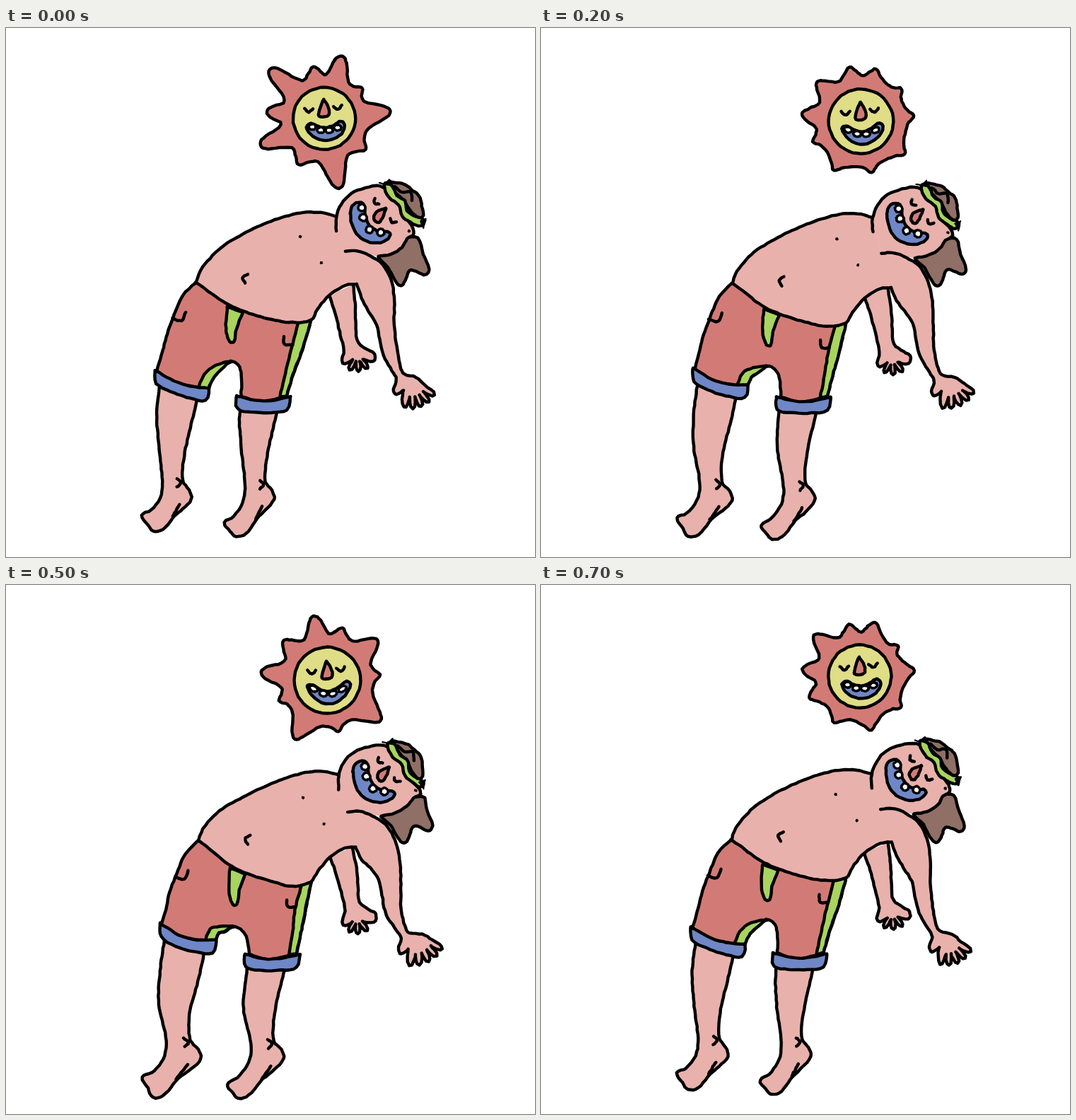
An HTML page for the animation above (0.8 s loop, 748 px wide and 748 px high).

```html
<!DOCTYPE html>
<html lang="en">
<head>
<meta charset="utf-8">
<title>Side bend in the sun</title>
<style>
html, body { margin: 0; width: 100%; height: 100%; overflow: hidden; background: #fff; }
svg { display: block; width: 100vw; height: 100vh; }
g { fill: none; stroke: #000; stroke-width: 4.4; stroke-linecap: round; stroke-linejoin: round;
  visibility: hidden; animation: show 800ms step-end infinite; }
@keyframes show { 0% { visibility: visible; } 12.5%, 100% { visibility: hidden; } }
.skin { fill: #e8b1ac; } .red { fill: #d27b76; } .green { fill: #a8d45f; } .blue { fill: #6f87c6; }
.brown { fill: #8f6f66; } .yellow { fill: #dfdd86; } .ink { fill: #000; stroke-width: 2; }
.neck { fill: #e8b1ac; stroke: none; } .dot { fill: #000; stroke: none; }
.tooth { fill: #fff; stroke-width: 3.4; }
</style>
</head>
<body>
<svg viewBox="0 0 748 748"></svg>
<script>
const NS = 'http://www.w3.org/2000/svg';
const STEPS = 8;
const svg = document.querySelector('svg');
const make = (tag, attrs, parent) => {
  const el = parent.appendChild(document.createElementNS(NS, tag));
  for (const k in attrs) el.setAttribute(k, attrs[k]);
  return el;
};
const random = seed => () => (seed = seed * 16807 % 2147483647) / 2147483647;
const rad = deg => deg * Math.PI / 180;
const polar = (x, y, deg, r) => [x + r * Math.cos(rad(deg)), y + r * Math.sin(rad(deg))];

// "x,y" points; a trailing * marks a sharp corner
const parse = s => s.split(' ').map(p => [...p.split(',').map(parseFloat), p.endsWith('*')]);

const ring = (x, y, rx, ry = rx) => Array.from({ length: 8 }, (_, i) =>
  [x + rx * Math.cos(i * Math.PI / 4), y + ry * Math.sin(i * Math.PI / 4)]);

// Short curved tick: closed eyes, ankles, pockets, navel
const tick = (x, y, deg, k = 1) => [[-6, -2], [0, 3], [6, -2]].map(([u, v]) =>
  polar(x, y, deg + Math.atan2(v, u) * 180 / Math.PI, k * Math.hypot(u, v)));

function fingers(x, y, from, to, tip, palm) {
  const pts = [], gap = (to - from) / 4;
  for (let i = 0; i < 5; i++) {
    pts.push(polar(x, y, from + gap * i, tip));
    if (i < 4) pts.push([...polar(x, y, from + gap * (i + 0.5), palm), true]);
  }
  return pts;
}

// Smooth hand-drawn line through the points
function curve(pts, closed, rnd) {
  const n = pts.length, out = [];
  const at = i => closed ? pts[(i + n) % n] : pts[Math.max(0, Math.min(n - 1, i))];
  const slope = (i, len) => {
    const a = at(i - 1), b = at(i + 1);
    const k = at(i)[2] ? 0 : len / (Math.hypot(b[0] - a[0], b[1] - a[1]) || 1);
    return [(b[0] - a[0]) * k, (b[1] - a[1]) * k];
  };
  for (let i = 0; i < (closed ? n : n - 1); i++) {
    const p = at(i), q = at(i + 1), len = Math.hypot(q[0] - p[0], q[1] - p[1]);
    const m = slope(i, len), k = slope(i + 1, len), cuts = Math.max(4, Math.ceil(len / 6));
    for (let j = i ? 1 : 0; j <= cuts; j++) {
      const t = j / cuts, u = t * t * (3 - 2 * t), v = t * (1 - t) ** 2, w = t * t * (t - 1);
      out.push([0, 1].map(c =>
        (p[c] + (q[c] - p[c]) * u + m[c] * v + k[c] * w + (rnd() - 0.5) * 0.9).toFixed(1)));
    }
  }
  return 'M' + out.join('L') + (closed ? 'Z' : '');
}

// Pins that pull the body into the deepest bend: x, y, dx, dy
const PINS = [
  [214, 712, 0, 16], [193, 689, 1, 8], [262, 666, 16, 4], [322, 714, 4, 8], [380, 666, 16, 4],
  [216, 590, 0, 4], [262, 580, 12, 0], [330, 600, 3, 2], [375, 590, 14, -2],
  [212, 484, 8, -7], [286, 511, 12, -9], [326, 520, 14, 2], [402, 520, 16, 1], [318, 472, 4, 13],
  [230, 430, 4, 3], [269, 360, 4, 2], [340, 400, 4, 8], [405, 416, 6, 12], [431, 413, 0, 8],
  [345, 287, 0, 10], [431, 310, 5, 7], [468, 267, 4, 2], [497, 362, -2, 10],
  [549, 410, 12, 4], [524, 420, 3, -4], [603, 519, 13, -5], [548, 511, 8, 4], [498, 478, -1, 9],
  [528, 262, 6, 3], [588, 275, -2, 7], [578, 340, 6, -2], [576, 291, 12, 4]
];
const bend = s => ([x, y, sharp]) => {
  let sum = 0, dx = 0, dy = 0;
  for (const [px, py, mx, my] of PINS) {
    const w = 1 / (Math.hypot(x - px, y - py) + 3) ** 3;
    sum += w; dx += w * mx; dy += w * my;
  }
  return [x + s * dx / sum, y + s * dy / sum, sharp];
};

// Sun rays: angle, stretched length, resting length
const RAYS = [[-74, 92, 77], [-39, 105, 69], [-6, 94, 75], [37, 108, 73], [78, 101, 74],
  [119, 107, 75], [157, 98, 74], [187, 102, 82], [222, 104, 84], [258, 104, 75]];

function drawSun(shape, s) {
  const cx = 450 + 5 * s, cy = 128 + 8 * s, r = 44 + 3.5 * s;
  const rim = [];
  RAYS.forEach(([deg, long, rest], i) => {
    const reach = i % 2 ? s ** 3 : (1 - s) ** 12;   // neighbours stretch in turn
    const len = rest + (long - rest) * reach;
    const next = i < 9 ? RAYS[i + 1][0] : RAYS[0][0] + 360;
    for (const side of [-1, 0, 1]) {
      const [x, y] = polar(cx, cy, deg, len - 8 * Math.abs(side));
      rim.push(polar(x, y, deg + 90, 8.5 * side));
    }
    rim.push(polar(cx, cy, (deg + next) / 2, 62 + 5 * s));
  });
  shape('red', rim);
  shape('yellow', ring(cx, cy, r));

  const place = ([x, y, sharp]) => [cx + x, cy + y, sharp];
  const grin = ([x, y]) => place([x * (1 + 0.15 * s), y + s * (3 - 0.011 * x * x)]);
  shape('', tick(-22, -12, 0).map(place), false);
  shape('', tick(19, -16, -8).map(place), false);
  shape('red', parse('-1,-27* -8,-5 -1,-2 7,-6 5,-18').map(place));
  shape('blue', parse('-25,12 -18,7 -9,11 2,13 14,9 24,4 29,11 22,24 3,31 -16,25').map(grin));
  for (let x = -17; x < 20; x += 12) shape('tooth', ring(x, 17 - 0.014 * (x - 2) ** 2, 5, 4).map(grin));
}

function drawLegs(body) {
  const left = p => p;
  const right = ([x, y, sharp]) => [x + 117, y + 0.15 * (262 - x), sharp];
  for (const side of [left, right]) {
    const put = (cls, pts) => body(cls, pts.map(side), false);
    put('skin', parse('217,508 213,545 216,590 221,640 218,664 205,682 192,689 200,702 208,711 222,709 238,690 250,680 262,666 259,653 250,640 252,605 262,560 272,518'));
    put('', tick(244, 643, -90));
    put('', parse('245,674 241,681 236,690'));
  }
}

function drawShorts(body) {
  const cuff = (x1, y1, x2, y2) => {
    const at = (t, h, sharp) => [x1 + (x2 - x1) * t, y1 + (y2 - y1) * t + 14 * t * (1 - t) + h, sharp];
    body('blue', [at(0, 0, true), at(0.35, 3), at(0.65, 3), at(1, 0, true),
      at(0.94, 18), at(0.65, 20), at(0.35, 20), at(0.02, 18)]);
  };
  body('red', parse('268,360* 250,378 240,400 228,432 220,462 213,486* 240,501 286,511* 292,497 303,484 318,472 328,476 333,490 332,520* 360,528 397,520* 406,490 419,455 428,425 432,410*'));
  body('green', parse('272,509* 280,490 296,477 318,471* 303,484 292,497 286,511*'));
  body('green', parse('414,414* 404,452 395,488 387,522* 397,520* 406,490 419,455 428,425 432,410*'));
  body('green', parse('313,394* 311,425 316,443 322,444 326,425 335,402*'));
  body('', tick(246, 409, -25, 1.7), false);
  body('', tick(397, 444, 42, 1.4), false);
  cuff(211, 484, 287, 509);
  cuff(326, 520, 402, 521);
}

function drawTorso(body) {
  body('neck', parse('468,270* 480,318* 527,323* 540,270*'));
  body('skin', [
    ...parse('480,316 497,315 515,322 533,335 545,358 549,385 549,420 553,455 558,480 563,489 580,494 592,505'),
    ...fingers(574, 502, 28, 108, 36, 20),
    ...parse('562,512* 552,518 548,511 552,497 546,485 534,463 528,440 524,420 512,400 503,382 496,362* 480,364 457,378 440,398 431,413 400,416 370,411 340,402 310,389 283,370 269,360* 275,343 300,314 330,294 360,279 390,268 420,261 445,261 468,267')
  ], false);
  body('dot', ring(416, 295, 2.2));
  body('dot', ring(446, 332, 2.2));
  body('', tick(338, 354, 105, 1.1), false);
}

function drawHead(body) {
  body('skin', parse('467,287 467,268 474,249 488,234 508,226 530,224 550,240 565,268 575,282 576,292 567,298 560,310 545,320 527,323'), false);
  body('brown', parse('540,219 553,219 565,222 575,230 584,237 588,252 588,268 575,262 563,245 550,232'));
  body('', parse('550,224 560,232 572,232 574,244'), false);
  body('green', parse('535,221 545,222 553,237 564,244 567,258 580,267 590,271 587,280 572,275 560,266 555,250 542,240'));
  body('ink', parse('528,219* 535,221* 542,214* 547,223*'));
  body('ink', parse('586,273* 594,270* 590,283*'));
  body('dot', ring(570, 287, 2.2));
  body('', tick(523, 246, 55, 0.8), false);
  body('', tick(547, 273, 30, 0.8), false);
  body('red', parse('537,255* 524,260 520,268 525,275 532,269'));
  body('blue', parse('487,262 492,249 505,248 508,265 515,280 528,288 543,290 538,300 520,304 502,297 491,283'));
  for (const [x, y] of parse('503,254 505,268 514,285 530,289')) body('tooth', ring(x, y, 5, 5));
}

for (let i = 0; i < STEPS; i++) {
  const s = (1 - Math.cos(2 * Math.PI * i / STEPS)) / 2;
  const g = make('g', { style: `animation-delay:${(i - STEPS) * 100}ms` }, svg);
  const rnd = random(7 + Math.min(i, STEPS - i));
  const shape = (cls, pts, closed = true) => make('path', { class: cls, d: curve(pts, closed, rnd) }, g);
  const body = (cls, pts, closed) => shape(cls, pts.map(bend(s)), closed);

  drawSun(shape, s);
  body('skin', [...parse('457,378 465,402 473,435 478,455'), ...fingers(497, 462, 150, 22, 24, 10),
    ...parse('521,461 512,455 498,445 495,425 494,395 491,362')], false);
  body('brown', parse('527,320 540,338 552,360 559,364 566,354 571,343 582,345 593,349 598,341 590,320 578,295'));
  drawLegs(body);
  drawShorts(body);
  drawTorso(body);
  drawHead(body);
}
</script>
</body>
</html>
```
